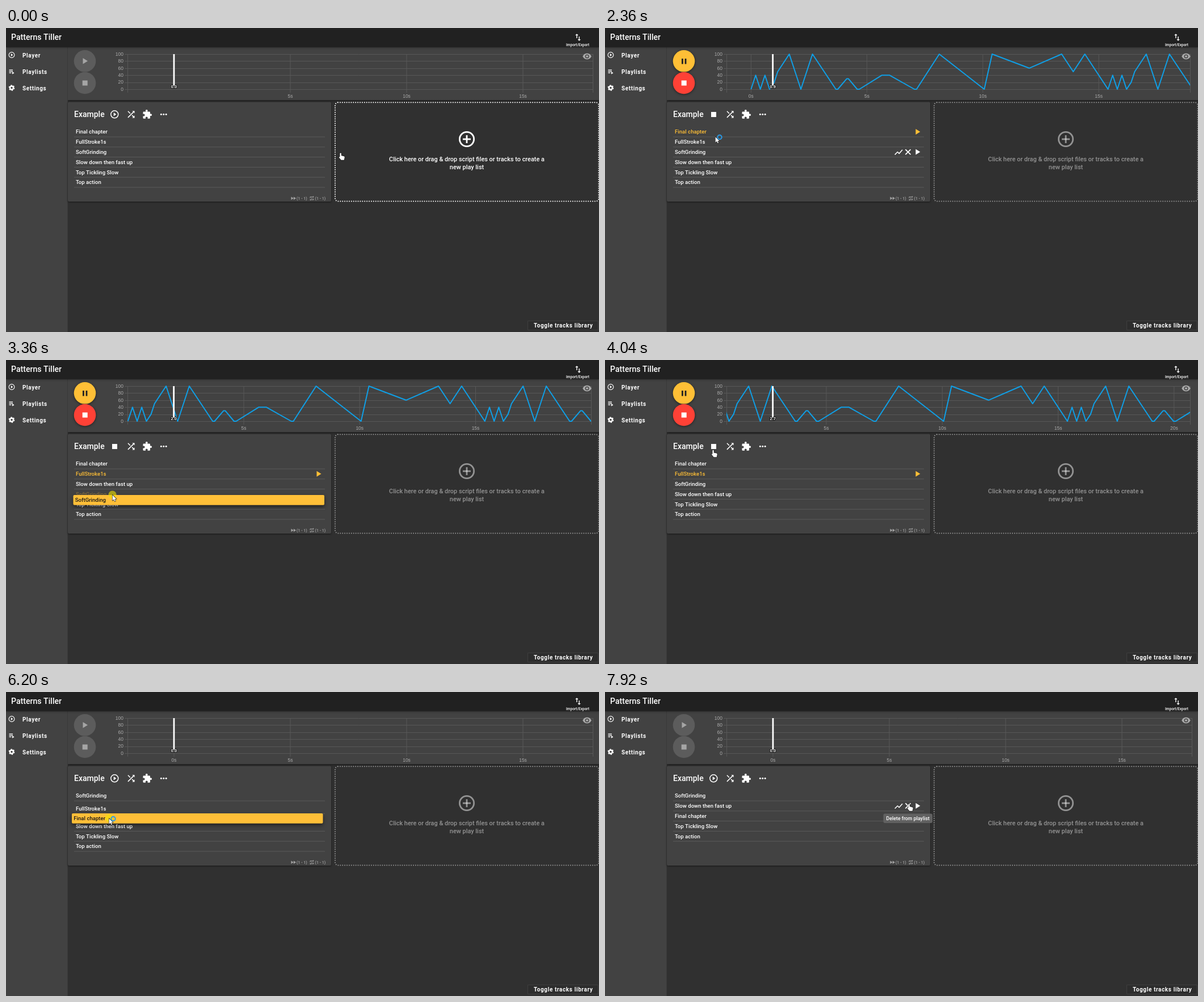
Animation, 1045 px wide and 536 px high, one loop 8000 ms. Source, as an HTML page with a canvas:

```html
<!DOCTYPE html>
<html lang="en">
<head>
<meta charset="utf-8">
<title>Playlist player</title>
<style>
html, body { margin: 0; width: 100%; height: 100%; overflow: hidden; background: #303030; }
canvas { display: block; }
</style>
</head>
<body>
<canvas id="stage" width="1045" height="536"></canvas>
<script>
const ctx = document.getElementById('stage').getContext('2d');
const LOOP = 8000;
const PLAY = 1461, STOP = 4200, RATE = 1.043;
const ROBOTO = 'Roboto, sans-serif', ARIAL = '"Liberation Sans", Arial, sans-serif';
const AMBER = '#ffbf36', CARD = '#424242', BACK = '#303030';
const TRACKS = ['Final chapter', 'FullStroke1s', 'SoftGrinding',
  'Slow down then fast up', 'Top Tickling Slow', 'Top action'];
const ROW_Y = 183, ROW_H = 17.8;

// Row order from each time on
const ORDERS = [[0, '012345'], [2560, '013245'], [3700, '012345'], [5120, '021345'],
  [5230, '201345'], [6120, '210345'], [6320, '213045'], [7760, '23045']];

const DRAGS = [
  { track: 2, from: 2460, to: 3840, dx: 68.5, dy: 0, ghost: 0.35 },
  { track: 2, from: 4840, to: 5560, dx: 51, dy: 9, ghost: 0 },
  { track: 0, from: 6050, to: 6540, dx: 65, dy: 9, ghost: 0 }
];
const PRESSES = [[1420, 1500], [2440, 3840], [4140, 4240], [4800, 5560], [6040, 6540], [7680, 7800]];
const BUSY = [[1500, 2440], [6080, 6400]];

// Pointer: time, x, y
const MOVES = [[160, 589, 220], [900, 189, 150], [1200, 192, 148], [1480, 190, 151],
  [1640, 240, 222], [1760, 244, 213], [1900, 246, 205], [2360, 194, 192], [2440, 189, 210],
  [2640, 193, 230], [2960, 189, 222], [3360, 187, 238], [3840, 190, 214], [4100, 190, 150],
  [4240, 190, 150], [4360, 186, 175], [4600, 180, 234], [4820, 171, 219], [5080, 183, 205],
  [5240, 184, 186], [5560, 183, 184], [5760, 188, 224], [5920, 185, 201], [6040, 185, 201],
  [6200, 181, 223], [6380, 179, 236], [6560, 182, 232], [6840, 474, 236], [7040, 706, 254],
  [7300, 535, 202], [7640, 535, 202], [7760, 535, 197]];

// Curve: seconds, value; repeats every PERIOD
const PERIOD = 15.4;
const CURVE = [[0, 0], [.2, 40], [.4, 0], [.6, 40], [.8, 0], [1, 20], [1.15, 50], [1.65, 100],
  [2.15, 0], [2.65, 100], [3.66, 0], [3.74, 0], [4.13, 30], [4.2, 30], [4.58, 0], [4.67, 0],
  [5.65, 40], [5.97, 40], [7.05, 0], [7.14, 0], [8.12, 100], [10.06, 0], [10.4, 100],
  [12, 60], [13.4, 100], [13.9, 50], [14.4, 100]];

const clamp = v => Math.max(0, Math.min(1, v));
const within = (list, t) => list.some(([a, b]) => t >= a && t < b);

function rect(x, y, w, h, fill, r = 0) {
  ctx.fillStyle = fill;
  ctx.beginPath();
  ctx.roundRect(x, y, w, h, r);
  ctx.fill();
}

function disc(x, y, r, fill) {
  ctx.fillStyle = fill;
  ctx.beginPath();
  ctx.arc(x, y, r, 0, 7);
  ctx.fill();
}

function ring(x, y, r, color, width) {
  ctx.strokeStyle = color;
  ctx.lineWidth = width;
  ctx.beginPath();
  ctx.arc(x, y, r, 0, 7);
  ctx.stroke();
}

function line(x1, y1, x2, y2, color, width = 1) {
  ctx.strokeStyle = color;
  ctx.lineWidth = width;
  ctx.beginPath();
  ctx.moveTo(x1, y1);
  ctx.lineTo(x2, y2);
  ctx.stroke();
}

function text(str, x, y, size, { color = '#fff', weight = 500, align = 'left', font = ROBOTO, gap = 0, outline } = {}) {
  ctx.font = `${weight} ${size}px ${font}`;
  ctx.letterSpacing = gap + 'px';
  ctx.textAlign = align;
  ctx.textBaseline = 'alphabetic';
  const base = y + size * 0.355;
  if (outline) {
    ctx.strokeStyle = outline;
    ctx.lineWidth = 2;
    ctx.lineJoin = 'round';
    ctx.strokeText(str, x, base);
  }
  ctx.fillStyle = color;
  ctx.fillText(str, x, base);
}

// Draws a path given on a 24 unit grid, centred on x, y
function icon(d, x, y, scale, color, stroke = 0) {
  ctx.save();
  ctx.translate(x, y);
  ctx.scale(scale, scale);
  ctx.translate(-12, -12);
  const p = new Path2D(d);
  if (stroke) {
    ctx.strokeStyle = color;
    ctx.lineWidth = stroke;
    ctx.stroke(p);
  } else {
    ctx.fillStyle = color;
    ctx.fill(p, 'evenodd');
  }
  ctx.restore();
}

function triangle(x, y, w, h, color) {
  ctx.fillStyle = color;
  ctx.beginPath();
  ctx.moveTo(x, y - h / 2);
  ctx.lineTo(x + w, y);
  ctx.lineTo(x, y + h / 2);
  ctx.fill();
}

function shadowed(draw, blur, dy) {
  ctx.save();
  ctx.shadowColor = 'rgba(0,0,0,.5)';
  ctx.shadowBlur = blur;
  ctx.shadowOffsetY = dy;
  draw();
  ctx.restore();
}

function playCircle(x, y, r, color) {
  ring(x, y, r, color, r * 0.23);
  triangle(x - r * 0.24, y, r * 0.7, r, color);
}

function gear(x, y) {
  ctx.setLineDash([2.1, 1.87]);
  ring(x, y, 3.8, '#fff', 3);
  ctx.setLineDash([]);
  ring(x, y, 3, '#fff', 2.4);
}

function puzzle(x, y) {
  rect(x - 7.5, y - 4.5, 12.5, 12.2, '#fff', 1.3);
  disc(x - 1.2, y - 6, 1.9, '#fff');
  disc(x + 6.1, y + 1.2, 1.9, '#fff');
  disc(x - 6.4, y + 1.4, 2, CARD);
  disc(x - 1.2, y + 6.6, 2, CARD);
}

function frame() {
  rect(0, 0, 1045, 536, BACK);
  shadowed(() => rect(109, 30, 940, 97, CARD), 4, 1);
  rect(0, 30, 108.5, 506, CARD);
  line(108.5, 34, 108.5, 536, '#3a3a3a');
  shadowed(() => rect(0, 0, 1045, 34, '#212121'), 4, 0);
  text('Patterns Tiller', 9, 16, 14.1);
  icon('M16 17V10h-2v7h-3l4 4 4-4zM9 3L5 7h3v7h2V7h3z', 1008, 16.5, 0.7, '#fff');
  text('Import/Export', 1007.5, 29.2, 6.5, { align: 'center' });

  playCircle(10, 47.5, 4.9, '#fff');
  [74, 76.5, 79].forEach((y, i) => line(5.5, y, i < 2 ? 12 : 9.5, y, '#fff', 1.3));
  triangle(11, 79.2, 3.6, 4.6, '#fff');
  gear(10, 105.5);
  ['Player', 'Playlists', 'Settings'].forEach((s, i) =>
    text(s, 29, 48 + 29 * i, 10, { weight: 700, gap: 0.6 }));

  rect(919.5, 516.5, 124, 16, '#2d2d2d', 2);
  ctx.strokeStyle = '#3e3e3e';
  ctx.lineWidth = 1;
  ctx.strokeRect(919.5, 516.5, 124, 16);
  text('Toggle tracks library', 930, 524.8, 10, { weight: 700, gap: 0.6 });
}

function dropPanel(t) {
  ctx.save();
  ctx.globalAlpha = 1 - 0.52 * clamp((t - 200) / 250);
  ctx.strokeStyle = '#fff';
  ctx.lineWidth = 2;
  ctx.lineCap = 'round';
  ctx.setLineDash([0, 3.9]);
  ctx.beginPath();
  ctx.roundRect(580, 131.3, 464.5, 174.2, 5);
  ctx.stroke();
  ctx.setLineDash([]);
  ctx.lineCap = 'butt';
  ring(812, 196, 12.6, '#fff', 2.8);
  line(805, 196, 819, 196, '#fff', 2.8);
  line(812, 189, 812, 203, '#fff', 2.8);
  text('Click here or drag & drop script files or tracks to create a', 812, 231.5, 10.9, { align: 'center' });
  text('new play list', 812, 244.7, 10.9, { align: 'center' });
  ctx.restore();
}

function controls(playing) {
  const round = (y, color) => shadowed(() => disc(139, y, 19.3, playing ? color : '#5c5c5c'), playing ? 4 : 0, playing ? 1 : 0);
  round(58.3, AMBER);
  round(97, '#ff4136');
  if (playing) {
    rect(135, 54, 2.8, 9.5, '#222');
    rect(140.6, 54, 2.8, 9.5, '#222');
  } else {
    triangle(135.5, 58.3, 8.5, 10.5, '#a5a5a5');
  }
  rect(134.7, 92.5, 9, 9, playing ? '#fff' : '#a5a5a5');
}

function chart(t, playing) {
  const now = playing ? (t - PLAY) / 1000 * RATE : 0;
  const left = 214, right = playing ? 1031 : 1034;
  const scale = (right - left) / 20;
  const head = left + 2 * scale;
  const px = s => head + (s - now) * scale;
  const py = v => 108 - v * 0.62;
  const grid = '#585858', label = { color: '#aaa', font: ARIAL, weight: 400 };

  for (let v = 0; v <= 100; v += 20) {
    const y = Math.round(py(v)) + 0.5;
    line(209, y, right, y, grid);
    text(String(v), 207, py(v) - 0.3, 8.5, { ...label, align: 'right' });
  }
  for (const x of [left, right]) line(x + 0.5, 46, x + 0.5, 114, grid);
  for (let s = 0; s <= 20; s += 5) {
    const x = px(s);
    if (x < left + 4 || x > right) continue;
    if (s === 0 && (playing ? now < 0.5 : t < STOP)) continue;
    line(x, 46, x, 114, grid);
    text(s + 's', x, 120, 8.5, { ...label, align: 'center' });
  }

  if (playing) {
    ctx.save();
    ctx.beginPath();
    ctx.rect(left, 44, right - left, 66);
    ctx.clip();
    ctx.beginPath();
    for (let k = 0; k < 2; k++)
      for (const [s, v] of CURVE) ctx.lineTo(px(s + k * PERIOD), py(v));
    ctx.strokeStyle = '#0f9fe6';
    ctx.lineWidth = 2;
    ctx.lineJoin = 'round';
    ctx.stroke();
    ctx.restore();
  }

  rect(head - 1.4, 46, 2.8, 56, '#fff');
  text(now.toFixed(1), head, 103.8, 7.4,
    { font: ARIAL, weight: 700, align: 'center', outline: '#111' });

  icon('M12 4.5C7 4.5 2.7 7.6 1 12c1.7 4.4 6 7.5 11 7.5s9.3-3.1 11-7.5c-1.7-4.4-6-7.5-11-7.5z' +
    'M12 7a5 5 0 0 1 0 10a5 5 0 0 1 0-10zM12 9a3 3 0 0 1 0 6a3 3 0 0 1 0-6z',
    1024, 50, 0.7, 'rgba(255,255,255,.55)');
}

function listHead(playing) {
  shadowed(() => rect(109, 130.5, 464, 175.5, CARD, 2), 3, 1);
  text('Example', 120, 152, 14);
  if (playing) rect(187, 148, 9, 9, '#fff');
  else playCircle(191.3, 152.3, 6.5, '#fff');
  icon('M4.7 4.7l5.2 5.2M14.1 14.1l4.6 4.6M4.7 19.3L18.5 5.5', 220.5, 152.3, 0.76, '#fff', 2);
  icon('M14.5 4H20v5.5zM14.5 20H20v-5.5z', 220.5, 152.3, 0.76, '#fff');
  puzzle(249, 152);
  for (const x of [-4.4, 0, 4.4]) disc(277.8 + x, 152.3, 1.5, '#fff');

  const gray = '#a2a2a2', small = { color: gray };
  triangle(502.5, 300.3, 4.3, 5.5, gray);
  triangle(506.8, 300.3, 4.3, 5.5, gray);
  text('(1 - 1)', 512, 300.3, 7, small);
  icon('M5 11V6h13M19 13v5H6M12 9v6', 539, 300.3, 0.42, gray, 2.4);
  icon('M17 2l4 4-4 4zM7 14l-4 4 4 4z', 539, 300.3, 0.42, gray);
  text('(1 - 1)', 544.5, 300.3, 7, small);
}

function rowTools(y) {
  icon('M2.7 19.2l6.8-6.8 4 4L21.7 7', 517.3, y - 0.3, 0.7, '#fff', 2.2);
  icon('M6 6l12 12M18 6L6 18', 534, y, 0.76, '#fff', 2.3);
  triangle(547.5, y, 8, 10, '#fff');
}

function row(track, y, active) {
  const color = active ? AMBER : '#fff';
  text(TRACKS[track], 123, y, 9.6, { color });
  line(120, y + 9, 562, y + 9, '#5a5a5a');
}

function rows(t, playing, drag, p) {
  const n = ORDERS.findLastIndex(o => o[0] <= t);
  const [since, order] = ORDERS[n];
  const before = n && ORDERS[n - 1][1].length === order.length ? ORDERS[n - 1][1] : order;
  const ease = 1 - (1 - clamp((t - since) / 220)) ** 3;
  const current = playing ? ((t - PLAY) / 1000 * RATE < 1.65 ? 0 : 1) : -1;

  let hover = -1;
  if (!drag && p.x > 120 && p.x < 562) hover = Math.floor((p.y - ROW_Y + 9) / ROW_H);
  // The page lags behind the pointer while it is busy
  if (t > 1640 && t < 2460) hover = 2;

  [...order].forEach((id, i) => {
    const track = +id, was = before.indexOf(id);
    const y = ROW_Y + ROW_H * (was + (i - was) * ease);
    if (drag && drag.track === track) {
      ctx.globalAlpha = drag.ghost;
      row(track, ROW_Y + ROW_H * i, true);
      ctx.globalAlpha = 1;
      return;
    }
    row(track, y, track === current);
    if (track === current) triangle(547.5, y, 8, 10, AMBER);
    else if (i === hover) rowTools(y);
  });
}

function dragBar(drag, p) {
  const x = p.x - drag.dx, y = p.y - drag.dy;
  shadowed(() => rect(x, y, 442.5, 17.8, '#ffbf38', 2), 6, 3);
  text(TRACKS[drag.track], x + 3.3, y + 9, 9.6, { color: '#161616' });
}

function tooltip(t) {
  ctx.globalAlpha = clamp((t - 7660) / 150);
  rect(490.5, 214.5, 86.5, 16.5, '#616161', 3);
  text('Delete from playlist', 533.7, 222.7, 8.8, { align: 'center' });
  ctx.globalAlpha = 1;
}

function pointerAt(t) {
  const n = MOVES.findLastIndex(m => m[0] <= t);
  const a = MOVES[Math.max(n, 0)], b = MOVES[n + 1] || a;
  const u = b === a ? 0 : clamp((t - a[0]) / (b[0] - a[0]));
  const k = u * u * (3 - 2 * u);
  return { x: a[1] + (b[1] - a[1]) * k, y: a[2] + (b[2] - a[2]) * k };
}

function pointer(t, p) {
  if (within(PRESSES, t)) disc(p.x + 0.5, p.y - 0.5, 7, 'rgba(240,225,0,.6)');
  const hand = p.x > 580 || p.y < 165 || t >= 7480;
  ctx.save();
  ctx.translate(p.x + 0.6, p.y);
  const shape = new Path2D(hand
    ? 'M-1.2 1q1.2-1.6 2.4 0v4l5 1.2q1.1.5.9 2l-.9 4.6h-5.2l-3.8-4.6q0-1.6 1.6-.8z'
    : 'M0 0v10l2.4-2.2 1.6 3.5 1.5-.7-1.6-3.4h3.2z');
  ctx.strokeStyle = '#111';
  ctx.lineWidth = 1.2;
  ctx.stroke(shape);
  ctx.fillStyle = '#fff';
  ctx.fill(shape);
  ctx.restore();
  if (within(BUSY, t)) ring(p.x + 8, p.y + 0.5, 3.7, '#2a9be8', 2);
}

function draw(t) {
  const playing = t >= PLAY && t < STOP;
  const drag = DRAGS.find(d => t >= d.from && t < d.to);
  const p = pointerAt(t);
  frame();
  controls(playing);
  chart(t, playing);
  dropPanel(t);
  listHead(playing);
  rows(t, playing, drag, p);
  if (drag) dragBar(drag, p);
  if (t > 7660) tooltip(t);
  pointer(t, p);
}

const start = performance.now();
function tick() {
  draw((performance.now() - start) % LOOP);
  requestAnimationFrame(tick);
}
tick();
</script>
</body>
</html>
```
